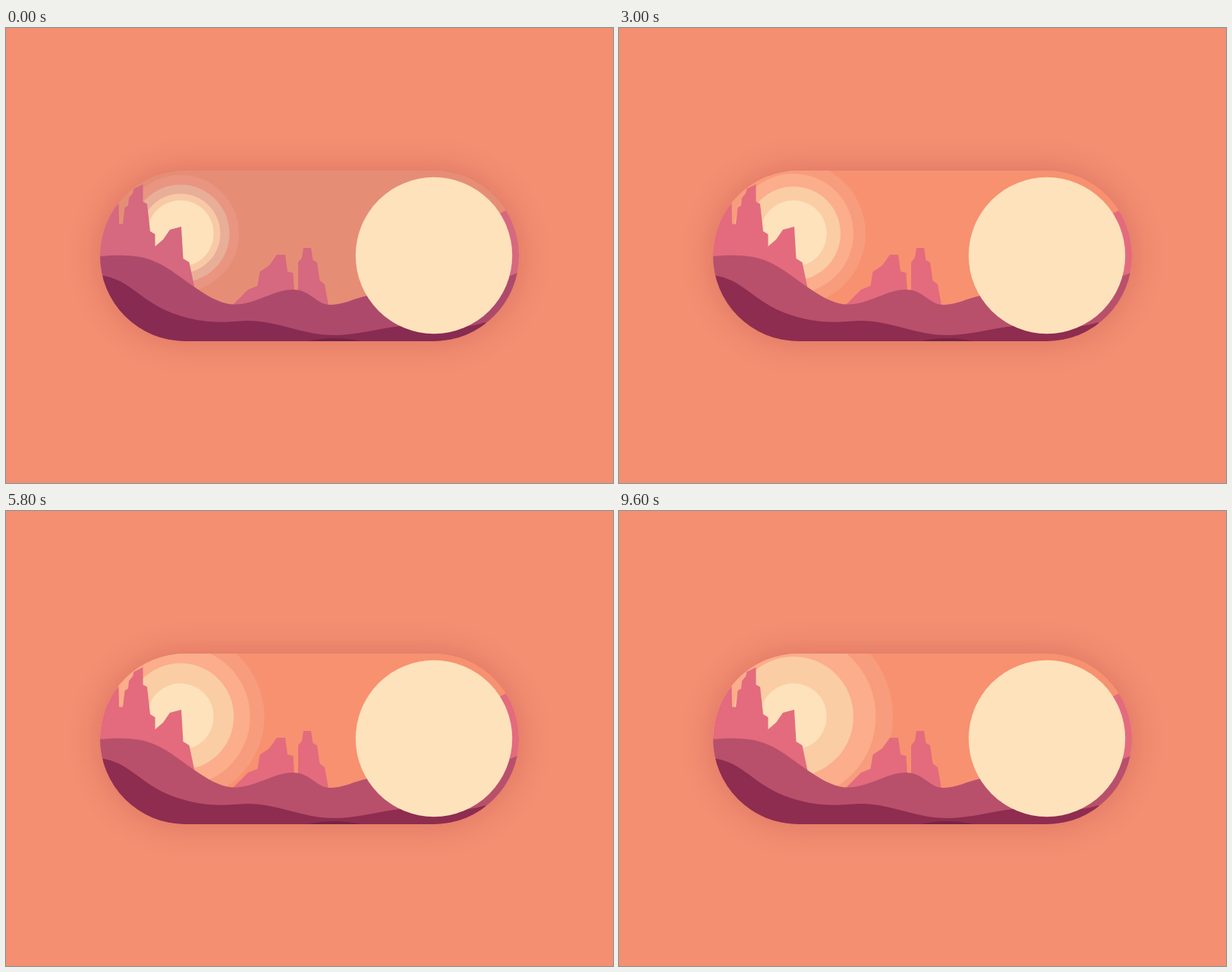
Write an HTML page without scripts that moves like this. It is 800x600 px and loops after 9800 ms.

```html
<!DOCTYPE html>
<html lang="en">
<head>
<meta charset="utf-8">
<title>Desert toggle</title>
<style>
  html, body {
    margin: 0;
    width: 100%;
    height: 100%;
    overflow: hidden;
    background: #f48f72;
  }

  .toggle {
    position: absolute;
    left: 124px;
    top: 188px;
    width: 552px;
    height: 225px;
    border-radius: 112.5px;
    overflow: hidden;
    box-shadow: 0 0 40px rgba(140, 30, 50, .26);
  }

  svg { display: block; }

  /* Each layer warms from its dusk tint to its day colour. */
  .layer {
    fill: var(--day);
    animation: dawn 9.8s infinite;
  }
  .sky   { --dusk: #e68d76; --day: #f79170; }
  .rock  { --dusk: #d6687f; --day: #e36b7d; }
  .dune  { --dusk: #ad4a6c; --day: #b8506b; }
  .front { --dusk: #882b52; --day: #8e2d4f; }
  .tip   { --dusk: #6f2346; --day: #742444; }
  .outer { --dusk: #e99581; --day: #f79c7c; }
  .mid   { --dusk: #e8ae98; --day: #fcad8b; }
  .inner { --dusk: #f8c9a6; --day: #facda5; }
  .sun   { fill: #fee2bb; }

  .outer { animation: dawn 9.8s infinite, grow-outer 9.8s infinite; }
  .mid   { animation: dawn 9.8s infinite, grow-mid 9.8s infinite; }
  .inner { animation: dawn 9.8s infinite, grow-inner 9.8s infinite; }

  @keyframes dawn {
    0% { fill: var(--dusk); animation-timing-function: steps(10, end); }
    /* 2000 ms, eased by the midpoint below */
    8.1633% { fill: color-mix(in srgb, var(--dusk) 22%, var(--day)); animation-timing-function: steps(6, end); }
    20.4082%, 100% { fill: var(--day); }
  }

  /* The glow advances every 200 ms. */
  @keyframes grow-outer {
    0%       { r: 77px;  animation-timing-function: steps(4, end); }
    8.1633%  { r: 82px;  animation-timing-function: steps(11, end); }
    30.6122% { r: 95px;  animation-timing-function: steps(8, end); }
    46.9388% { r: 104px; animation-timing-function: steps(12, end); }
    71.4286% { r: 117px; animation-timing-function: steps(7, end); }
    85.7143% { r: 125px; animation-timing-function: steps(6, end); }
    97.9592%, 100% { r: 131px; }
  }
  @keyframes grow-mid {
    0%       { r: 64.5px; animation-timing-function: steps(4, end); }
    8.1633%  { r: 68px;   animation-timing-function: steps(11, end); }
    30.6122% { r: 79px;   animation-timing-function: steps(8, end); }
    46.9388% { r: 86px;   animation-timing-function: steps(12, end); }
    71.4286% { r: 97.5px; animation-timing-function: steps(7, end); }
    85.7143% { r: 103.5px; animation-timing-function: steps(6, end); }
    97.9592%, 100% { r: 108.5px; }
  }
  @keyframes grow-inner {
    0%       { r: 52.5px; animation-timing-function: steps(4, end); }
    8.1633%  { r: 55px;   animation-timing-function: steps(11, end); }
    30.6122% { r: 62px;   animation-timing-function: steps(8, end); }
    46.9388% { r: 67px;   animation-timing-function: steps(12, end); }
    71.4286% { r: 73.5px; animation-timing-function: steps(7, end); }
    85.7143% { r: 76.5px; animation-timing-function: steps(6, end); }
    97.9592%, 100% { r: 79px; }
  }
</style>
</head>
<body>
<div class="toggle">
  <svg width="552" height="225" viewBox="124 188 552 225">
    <rect class="layer sky" x="124" y="188" width="552" height="225"/>

    <circle class="layer outer" cx="230" cy="271" r="77"/>
    <circle class="layer mid" cx="230" cy="271" r="64.5"/>
    <circle class="layer inner" cx="230" cy="271" r="52.5"/>
    <circle class="sun" cx="230" cy="271" r="43.7"/>

    <g class="layer rock">
      <path d="M120 260L148.500 231 149 258.500H154L156.500 237 161 234 162 224 167 218 168.500 212 180.500 206V229L186 232 190 268 196.500 272V288L207 279 216 266 231 262 233.500 304 241.500 309 248 340 252 360H120Z"/>
      <path d="M298 366L319 345 331.500 340 334.500 321.500 347 313 357 299H368L371 321 378.500 323 380 350V366Z"/>
      <path d="M385 366V309L390 303 392 290H402L404.500 306 410 309 413.500 333 420 338 425 366Z"/>
      <path d="M630 300L652 244 660 240H680V350H630Z"/>
    </g>

    <path class="layer dune" d="M120 301.500C180 295 200 306 232 330C262 352 282 364.500 301 364.500C330 364.500 352 345 378 345C402 345 408 365 428 365C445 365 460 356 476 353C540 340 620 350 680 320V413H120Z"/>
    <path class="layer front" d="M120 325.500C165 329 175 362 228 379C270 392 295 387 317 386C360 386 390 405 432 405C465 405 490 396 520 393C560 390 590 401 632 388V413H120Z"/>
    <path class="layer tip" d="M398 413Q432 405 468 413Z"/>

    <circle class="sun" cx="564" cy="300" r="103.200"/>
  </svg>
</div>
</body>
</html>
```
